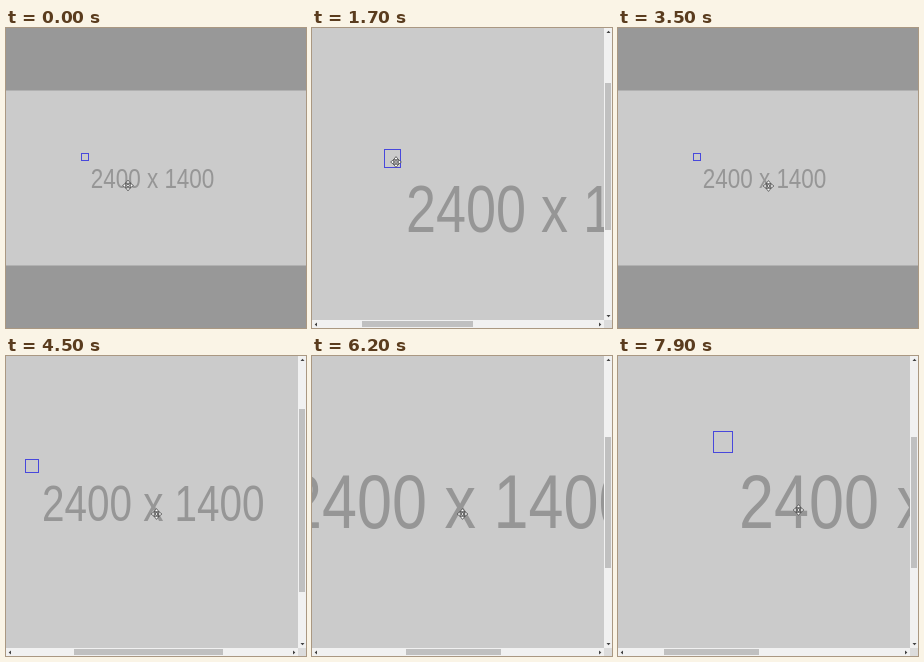
These frames come from a looping animation (300x300 px, 8 s). An HTML page with a canvas:

```html
<!DOCTYPE html>
<html lang="en">
<head>
<meta charset="utf-8">
<title>Zoom and pan</title>
<style>
  html, body { margin: 0; width: 100%; height: 100%; overflow: hidden; background: #989898; }
  canvas { display: block; width: 300px; height: 300px; }
</style>
</head>
<body>
<canvas id="stage" width="300" height="300"></canvas>
<script>
const ctx = document.getElementById('stage').getContext('2d');
const LOOP = 8000, STEP = 100;
const SIZE = 300, VIEW = 292, MARGIN = 62.5, IMAGE_H = 175;
const NARROW = 0.82; // width ratio of the narrow sans face

const ramp = (t, from, to) => Math.min(1, Math.max(0, (t - from) / (to - from)));
const smooth = p => p * p * (3 - 2 * p);
const accelerate = p => p * p;

function zoomAt(t) {
  return 1 + 4.2 * (ramp(t, 1000, 1200) - ramp(t, 1500, 1800))
    + 2.4 * ramp(t, 4400, 4700) - 0.6 * ramp(t, 5500, 5800);
}

// Follows the hand: free moves are smooth, drags accelerate and pull the view along.
function pointerAt(t) {
  let x = 122, y = 157.5, pulled = 0;
  const move = (from, to, toX, toY, ease = smooth) => {
    const p = ease(ramp(t, from, to)), dx = (toX - x) * p;
    x += dx;
    y += (toY - y) * p;
    return dx;
  };
  const drag = (from, to, toX, toY) => { pulled += move(from, to, toX, toY, accelerate); };

  move(0, 400, 81, 134.5);
  move(500, 600, 84, 134);
  move(2200, 2800, 162, 164);
  move(2800, 3100, 150.5, 162);
  move(3300, 3500, 150.5, 158);
  move(6200, 6400, 132, 157);
  drag(6400, 7000, 197.5, 156.5);
  move(7000, 7500, 100, 154.5);
  drag(7500, 7900, 180.5, 154);
  return { x, y, pulled };
}

function rect(color, x, y, w, h) {
  ctx.fillStyle = color;
  ctx.fillRect(x, y, w, h);
}

function triangle(tip, base, half) {
  ctx.beginPath();
  ctx.moveTo(0, -tip);
  ctx.lineTo(half, -base);
  ctx.lineTo(-half, -base);
  ctx.closePath();
}

function drawImage(zoom, left, top) {
  rect('#989898', 0, 0, SIZE, SIZE);
  rect('#cbcbcb', -left, MARGIN - top, SIZE * zoom, IMAGE_H * zoom);

  ctx.save();
  ctx.translate(84.7 * zoom - left, MARGIN + 97.3 * zoom - top);
  ctx.scale(NARROW, 1);
  ctx.font = `${27.4 * zoom}px "Liberation Sans", Arial, sans-serif`;
  ctx.fillStyle = '#969696';
  ctx.fillText('2400 x 1400', 0, 0);
  ctx.restore();

  const snap = v => Math.floor(v) + 0.5;
  const x = snap(75.6 * zoom - left), right = snap(82.5 * zoom - left);
  const y = snap(MARGIN + 62.7 * zoom - top), bottom = snap(MARGIN + 70.3 * zoom - top);
  ctx.strokeStyle = '#4848dc';
  ctx.lineWidth = 1;
  ctx.strokeRect(x, y, right - x, bottom - y);
}

// Draws a horizontal bar; the vertical one is the same bar mirrored on the diagonal.
function drawScrollbar(scroll, content) {
  const track = VIEW - 16;
  rect('#f1f1f1', 0, VIEW, VIEW, 8);
  rect('#c0c0c0', Math.round(8 + track * scroll / content), VIEW + 1,
    Math.floor(track * VIEW / content), 6);
  for (const [x, turn] of [[4, -1], [VIEW - 4, 1]]) {
    ctx.save();
    ctx.translate(x, VIEW + 4.5);
    ctx.rotate(turn * Math.PI / 2);
    triangle(1.3, -1, 2);
    ctx.fillStyle = '#404040';
    ctx.fill();
    ctx.restore();
  }
}

function drawCursor(x, y) {
  ctx.save();
  ctx.translate(x, y);
  ctx.lineWidth = 0.7;
  ctx.strokeStyle = '#333';
  ctx.fillStyle = '#fff';
  for (let i = 0; i < 4; i++) {
    triangle(5.4, 2.3, 2.4);
    ctx.fill();
    ctx.stroke();
    ctx.rotate(Math.PI / 2);
  }
  ctx.beginPath();
  ctx.arc(0, 0, 1.3, 0, 2 * Math.PI);
  ctx.fill();
  ctx.stroke();
  ctx.restore();
}

function draw(t) {
  const zoom = zoomAt(t);
  const { x, y, pulled } = pointerAt(t);
  const [focusX, focusY] = t < 2000 ? [78, 65.6] : [145.6, 90.4];
  const left = focusX * (zoom - 1) - pulled;
  const top = focusY * (zoom - 1);

  drawImage(zoom, left, top);
  if (zoom > 1.001) {
    drawScrollbar(left, SIZE * zoom);
    ctx.save();
    ctx.transform(0, 1, 1, 0, 0, 0);
    drawScrollbar(top, IMAGE_H * zoom + 2 * MARGIN);
    ctx.restore();
    rect('#dcdcdc', VIEW, VIEW, 8, 8);
  }
  drawCursor(x, y);
}

const start = performance.now();
function frame() {
  const t = (performance.now() - start) % LOOP;
  draw(Math.floor(t / STEP) * STEP);
  requestAnimationFrame(frame);
}
frame();
</script>
</body>
</html>
```
